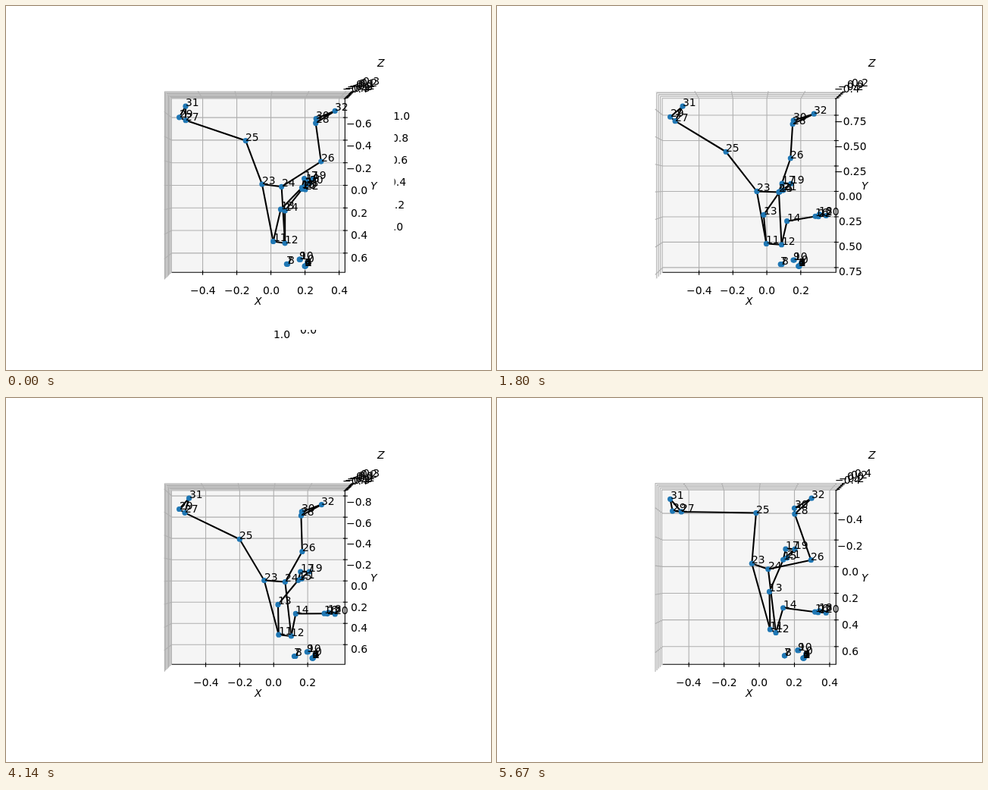
These frames come from a looping animation (640 by 480 pixels, 5.7 s). An HTML page with a canvas:

```html
<!DOCTYPE html>
<html lang="en">
<head>
<meta charset="utf-8">
<title>Pose plot</title>
<style>
html, body { margin: 0; width: 100%; height: 100%; overflow: hidden; background: #fff; }
canvas { display: block; }
</style>
</head>
<body>
<canvas id="stage" width="640" height="480"></canvas>
<script>
const ctx = document.getElementById('stage').getContext('2d');
const LOOP = 5700, STEP = 30;
const FONT = '13.89px "DejaVu Sans", sans-serif';

// Joint positions in plot units: folded [x, y], then stretched [x, y].
const ends = {
  0: [[.237, .644], [.203, .705]],
  11: [[.046, .461], [-.003, .515]],
  12: [[.074, .489], [.087, .525]],
  13: [[.03, .178], [-.019, .231]],
  14: [[.138, .31], [.13, .312]],
  15: [[.064, -.064], [.076, .004]],
  16: [[.322, .35], [.295, .31]],
  23: [[-.038, -.029], [-.059, 0]],
  24: [[.046, .022], [.071, .007]],
  25: [[.034, -.406], [-.242, -.39]],
  26: [[.33, .015], [.139, -.328]],
  27: [[-.42, -.347], [-.541, -.694]],
  28: [[.213, -.333], [.152, -.664]],
  29: [[-.475, -.344], [-.57, -.735]],
  30: [[.21, -.378], [.157, -.7]],
  31: [[-.508, -.43], [-.496, -.84]],
  32: [[.302, -.455], [.278, -.765]]
};

// Turning points of the leg movement: time, stretch.
const turns = [[-395, 1], [600, 0], [1850, 1], [3170, 0], [4470, 1], [4880, 1], [5985, 0]];

const chains = [
  [15, 13, 11, 12, 14, 16], [11, 23, 24, 12], [23, 25, 27, 29, 31, 27],
  [24, 26, 28, 30, 32, 28], [15, 17, 19, 15, 21], [16, 18, 20, 16, 22]
];

const lerp = (a, b, k) => a + (b - a) * k;
const ease = u => .5 - .5 * Math.cos(Math.PI * Math.min(1, Math.max(0, u)));

function stretchAt(t) {
  const n = turns.findIndex(turn => turn[0] > t);
  const [t0, a] = turns[n - 1], [t1, b] = turns[n];
  return lerp(a, b, ease((t - t0) / (t1 - t0)));
}

function bodyAt(t, stretch) {
  const j = [];
  for (const id in ends) {
    const [a, b] = ends[id];
    j[id] = [lerp(a[0], b[0], stretch), lerp(a[1], b[1], stretch)];
  }
  const move = (id, x, y = 0) => { j[id][0] += x; j[id][1] += y; };
  const attach = (id, from, x, y) => { j[id] = [j[from][0] + x, j[from][1] + y]; };

  // The upper body drifts sideways later on.
  const lean = ease((t - 1800) / 900);
  move(0, .035 * lean);
  move(11, .025 * lean);
  move(12, .018 * lean);
  move(13, .037 * lean);
  move(15, .07 * lean);

  // One arm swings out and one leg swings in as the loop begins.
  const raised = Math.exp(-t / 1200), early = Math.exp(-t / 220);
  move(13, .06 * early);
  move(14, -.05 * raised, -.087 * raised);
  move(15, .11 * early, .04 * early);
  move(16, -.04 * raised - .08 * early, -.29 * raised);
  for (const id of [26, 28, 30, 32]) move(id, .09 * early);

  for (let i = 1; i <= 6; i++) attach(i, 0, -.016 + (i % 3) * .002, .031);
  attach(7, 0, -.122, .013);
  attach(8, 0, -.122 + .008 * stretch, .013);
  attach(9, 0, -.047, -.028);
  attach(10, 0, -.042, -.028);
  attach(17, 15, .014, -.081);
  attach(19, 15, .066, -.08);
  attach(21, 15, .021, -.014);
  attach(18, 16, .024, -.007 - .06 * raised);
  attach(20, 16, .063 - .02 * early, .007 - .06 * raised);
  attach(22, 16, .018, .003);
  return j;
}

// The view always fits the body, so limits and ticks follow from its extent.
function fit(values, from, to) {
  const lo = Math.min(...values), hi = Math.max(...values);
  const scale = (to - from) / (hi - lo);
  return { scale, zero: from - lo * scale };
}

const L = 218.7, R = 447.3, T = 122.3, B = 351.3, CX = 333, CY = 236.8;
const near = (x, y, f = 1) => [CX + (x - CX) * (1 + .087 * f), CY + (y - CY) * (1 + .087 * f)];

function trace(points) {
  ctx.beginPath();
  points.forEach(p => ctx.lineTo(...p));
}

function path(points, color = '#000', width = 1.11) {
  trace(points);
  ctx.strokeStyle = color;
  ctx.lineWidth = width;
  ctx.stroke();
}

function fill(points, color) {
  trace(points);
  ctx.fillStyle = color;
  ctx.fill();
}

function label(text, x, y, align = 'center') {
  const width = ctx.measureText(text).width;
  const left = x - width * { left: 0, center: .5, right: 1 }[align];
  ctx.fillStyle = '#000';
  ctx.fillText(text, Math.round(left), Math.round(y));
}

const number = (v, digits = 1) => (v < -1e-6 ? '\u2212' : '') + Math.abs(v).toFixed(digits);

function ticks(step, lo, hi) {
  const list = [];
  for (let k = Math.ceil(lo / step); k * step <= hi; k++) list.push(k * step);
  return list;
}

function drawAxes(h, v, stretch) {
  const grid = '#b0b0b0';
  const yStep = v.scale < 137 ? .25 : .2;
  const zSpan = .75 + .3 * Math.abs(stretch - .78), zLow = -.55 * zSpan;
  const zStep = zSpan > .8 ? .2 : .1;

  const xs = ticks(.2, (224 - h.zero) / h.scale, (441 - h.zero) / h.scale)
    .map(n => ({ text: number(n), x: h.zero + n * h.scale }));
  const ys = ticks(yStep, (125 - v.zero) / v.scale, (349 - v.zero) / v.scale)
    .map(n => ({ text: number(n, yStep === .25 ? 2 : 1), y: v.zero + n * v.scale }));
  const zs = ticks(zStep, zLow, zLow + zSpan)
    .map(n => ({ text: number(n), f: (n - zLow) / zSpan }));

  fill([[L, T], [L, B], near(L, B), near(L, T)], '#f9f9f9');
  fill([[L, T], [R, T], near(R, T), near(L, T)], '#f2f2f2');
  fill([[L, T], [R, T], [R, B], [L, B]], '#f5f5f5');

  for (const { x } of xs) path([near(x, T), [x, T], [x, B]], grid);
  for (const { y } of ys) path([near(L, y), [L, y], [R, y]], grid);
  for (const { f } of zs) path([near(L, B, f), near(L, T, f), near(R, T, f)], grid);

  path([[L, B], [R, B], [R, T], near(R, T)]);

  for (const { text, x } of xs) {
    path([[x, B - 2.5], [x, B + 3.5]]);
    label(text, x, 380);
  }
  for (const { text, y } of ys) {
    path([[R - 2.5, y], [R + 3.5, y]]);
    label(text, 466, y + 13 - (y - T) / 90);
  }
  for (const { text, f } of zs) {
    const [x, y] = near(R, T, f);
    path([[x - 2, y + .6], [x + 4, y - 1]]);
    label(text, 460 + 23.6 * f, 114.8 - 11.5 * f);
  }

  ctx.font = 'italic ' + FONT;
  label('X', 333, 394);
  label('Y', 485.5, 242);
  label('Z', 494.5, 80);
  ctx.font = FONT;
}

function drawBody(joints) {
  ctx.lineJoin = 'round';
  ctx.lineCap = 'square';
  for (const c of chains) path(c.map(i => joints[i]), '#000', 2.08);
  ctx.lineCap = 'butt';
  ctx.fillStyle = '#1f77b4';
  for (const [x, y] of joints) {
    ctx.beginPath();
    ctx.arc(x, y, 3.6, 0, 7);
    ctx.fill();
  }
  joints.forEach(([x, y], i) => label(i, x, y, 'left'));
}

// Clipped remains of an empty plot, seen only as the loop begins.
function drawRemains() {
  ctx.save();
  ctx.beginPath();
  ctx.rect(512.5, 130, 40, 180);
  ctx.rect(340, 427, 90, 30);
  ctx.clip();
  for (let i = 0; i < 6; i++) {
    label(number(1 - i * .2), 533 - i * 1.7, 150 + i * 29.15, 'right');
  }
  label('1.0', 364.5, 437.7);
  label('0.0', 399, 431.5);
  ctx.restore();
}

function draw(t) {
  ctx.fillStyle = '#fff';
  ctx.fillRect(0, 0, 640, 480);
  ctx.font = FONT;
  const stretch = stretchAt(t);
  const body = bodyAt(t, stretch);
  const h = fit(body.map(p => p[0]), 228.6, 434.2);
  const v = fit(body.map(p => p[1]), 132.2, 343);
  drawAxes(h, v, stretch);
  drawBody(body.map(([x, y]) => [h.zero + x * h.scale, v.zero + y * v.scale]));
  if (t < STEP) drawRemains();
}

const began = performance.now();
function tick() {
  const t = (performance.now() - began) % LOOP;
  draw(Math.floor(t / STEP) * STEP);
  requestAnimationFrame(tick);
}
tick();
</script>
</body>
</html>
```
